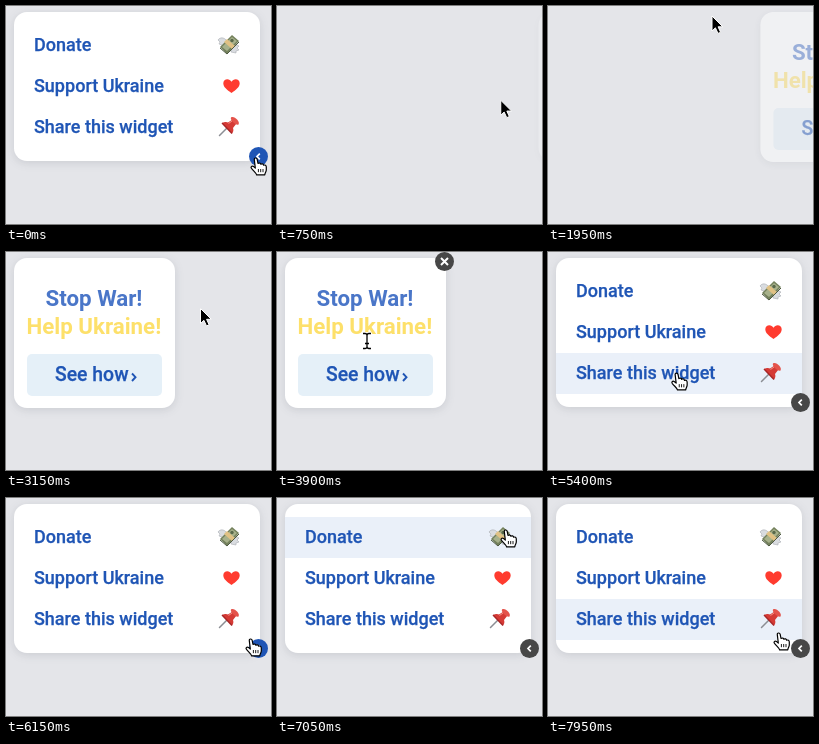
These frames come from a looping animation (265 by 218 pixels, 8000 ms). An HTML page:

```html
<!DOCTYPE html>
<html lang="en">
<head>
<meta charset="utf-8">
<style>
  html, body { margin: 0; width: 100%; height: 100%; overflow: hidden; background: #e4e5e9; }
  svg { display: block; width: 265px; height: 218px; }
  text { font-family: Roboto, sans-serif; font-weight: 700; fill: #1f55b5; }
  .item { font-size: 18px; font-weight: 500; stroke: #1f55b5; stroke-width: .25px; }
  .title { font-size: 22.3px; }
  .panel { fill: #fff; filter: drop-shadow(0 2px 4px rgba(40, 45, 65, .13)); }
  .hand { fill: #fff; stroke: #000; stroke-width: 1.2; stroke-linejoin: round; }
</style>
</head>
<body>
<svg viewBox="0 0 265 218">
  <g id="menu">
    <rect class="panel" x="8" y="6" width="246" height="149" rx="13"/>
    <rect id="row" x="8" width="246" height="41" fill="#eaf0f9"/>
    <text class="item" x="28" y="45">Donate</text>
    <text class="item" x="28" y="86">Support Ukraine</text>
    <text class="item" x="28" y="127">Share this widget</text>

    <g id="money">
      <path d="M221 35C218 31 214 31 212 34L214 36L213 38L216 39L216 41L220 41Z" fill="#d9dce0" stroke="#a9adb2" stroke-width=".6"/>
      <path d="M225 40L229 38L233 40L231 42L233 44L230 45L230 47L225 46Z" fill="#d9dce0" stroke="#a9adb2" stroke-width=".6"/>
      <path d="M214 41L226 29L233 35L221 48Z" fill="#73805b"/>
      <path d="M216 41L226 31L231 35L221 45Z" fill="#a7b18b"/>
      <path d="M218 36L221 33L229 40L226 43Z" fill="#e0c184"/>
      <circle cx="226" cy="34.5" r="1.7" fill="#59694a"/>
      <path d="M214 42L221 48L233 36" fill="none" stroke="#4e5a42"/>
    </g>

    <path id="heart" d="M225.5 87C221 84 217.3 81 217.3 77.3C217.3 72.5 223.4 71.7 225.5 75.7C227.6 71.7 233.7 72.5 233.7 77.3C233.7 81 230 84 225.5 87Z" fill="#ff3b2f"/>

    <g id="pin">
      <path d="M221 122L213.5 129.5" stroke="#8b8e94" stroke-width="1.5" stroke-linecap="round"/>
      <path d="M216 117C219 115.5 221 116 222 116.5L226.5 113.5L230.5 117.5L227 122C227.7 124 227.5 126 226 127.5Z" fill="#d53a35"/>
      <path d="M225 111.5C228 109.5 234.5 115.5 232.5 118.5C230.5 120 223.5 114 225 111.5Z" fill="#e4534b"/>
      <path d="M216 117L226 127.5" stroke="#a62526" stroke-width="1.4"/>
      <path d="M222.5 117.5L226 115" stroke="#f59488"/>
    </g>

    <circle id="toggle" cx="252.5" cy="150.5" r="9.5"/>
    <path d="M253.8 147.7L251 150.5L253.8 153.3" fill="none" stroke="#fff" stroke-width="1.7"/>
  </g>

  <g id="promo">
    <rect class="panel" x="8" y="6" width="161" height="150" rx="13"/>
    <text class="title" x="39.5" y="54" style="fill:#4a76c8">Stop War!</text>
    <text class="title" x="20.5" y="82" style="fill:#fde06a">Help Ukraine!</text>
    <rect x="21" y="102" width="135" height="42" rx="5" fill="#e5f0f8"/>
    <text x="49" y="129" font-size="19.4" style="font-weight:500;stroke:#1f55b5;stroke-width:.25px">See how</text>
    <path d="M126 121.5L129.5 125.2L126 129" fill="none" stroke="#1f55b5" stroke-width="1.9"/>
    <g id="close">
      <circle cx="167.5" cy="9.5" r="9.5" fill="#474747"/>
      <path d="M164 6L171 13M171 6L164 13" stroke="#fff" stroke-width="2"/>
    </g>
  </g>

  <g id="cursor">
    <path id="arrow" d="M0 0V15L3.4 11.8L6 17.4L8.6 16.3L6.1 10.8H10.8Z" fill="#000" stroke="#fff"/>
    <g id="hand" class="hand">
      <path d="M-1.7 1.6C-2 -.4 .8 -.6 1.2 1.4L2 5.5C3 4.6 4.6 5 4.8 6.2C6 5.4 7.4 5.9 7.6 7.2C9 6.6 10.3 7.4 10.3 9V12C10.2 14 9 15 8.8 16.8H.6C.3 15 -2 13.4 -4.5 10.4C-5.8 8.6 -4 7.4 -2.4 8.6L-.7 10Z"/>
      <path d="M2.4 11V14.2M4.7 11V14.2M7 11V14.2" stroke-width=".9"/>
    </g>
    <g id="beam" fill="none">
      <path d="M-4 -7.5H-2Q0 -7.5 0 -5.5Q0 -7.5 2 -7.5H4M-4 7.5H-2Q0 7.5 0 5.5Q0 7.5 2 7.5H4M0 -5.5V5.5M-2 2.5H2" stroke="#fff" stroke-width="3"/>
      <path d="M-4 -7.5H-2Q0 -7.5 0 -5.5Q0 -7.5 2 -7.5H4M-4 7.5H-2Q0 7.5 0 5.5Q0 7.5 2 7.5H4M0 -5.5V5.5M-2 2.5H2" stroke="#000" stroke-width="1.3"/>
    </g>
  </g>
</svg>
<script>
const LOOP = 8000, STEP = 150, WIDTH = 265;
const el = id => document.getElementById(id);
const clamp = v => Math.min(1, Math.max(0, v));
const ease = u => u * u * (3 - 2 * u);

// time, x, y of the pointer's hot spot
const path = [
  [0, 250, 152], [300, 250, 152], [900, 215, 75], [1350, 170, 17], [1500, 167, 13], [1650, 164, 10],
  [2400, 164, 10], [2850, 190, 35], [3450, 199, 78], [3600, 190, 84], [3900, 90, 89],
  [4200, 105, 108], [4500, 128, 122], [5550, 129, 121], [5700, 195, 138], [5850, 250, 150],
  [6000, 250, 150], [6150, 245, 141], [6450, 234, 113], [7050, 229, 32], [7200, 228, 33],
  [7500, 228, 66], [7950, 231, 135], [8000, 231, 135]
];

function pointerAt(t) {
  const i = path.findIndex(key => key[0] > t);
  const [t0, x0, y0] = path[i - 1], [t1, x1, y1] = path[i];
  const u = (t - t0) / (t1 - t0);
  return [x0 + (x1 - x0) * u, y0 + (y1 - y0) * u];
}

const slideIn = (t, start) => ease(clamp((t - start) / 400));

function place(id, shown) {
  el(id).setAttribute('transform', `translate(${WIDTH * (1 - shown)})`);
  el(id).setAttribute('opacity', Math.sqrt(shown));
}

const show = (id, on) => el(id).setAttribute('visibility', on ? 'visible' : 'hidden');

function draw(time) {
  const t = Math.floor(time % LOOP / STEP) * STEP;
  const [x, y] = pointerAt(t);
  const menu = t < 2000 ? 1 - slideIn(t, 400) : slideIn(t, 4694);
  const promo = t < 4500 ? slideIn(t, 1826) : 1 - slideIn(t, 4450);
  place('menu', menu);
  place('promo', promo);

  const onMenu = menu === 1, onPromo = promo === 1 && x < 169;
  const onToggle = menu > .9 && Math.hypot(x - 252.5, y - 150.5) < 12.5;
  const row = Math.floor((y - 19) / 41);
  const onRow = onMenu && !onToggle && x < 254 && row >= 0 && row < 3;
  const onClose = onPromo && Math.hypot(x - 167.5, y - 9.5) < 9.5;
  const onButton = onPromo && x > 21 && x < 156 && y > 102 && y < 144;

  el('toggle').setAttribute('fill', onToggle ? '#1f55b5' : '#474747');
  el('row').setAttribute('y', 19 + 41 * row);
  show('row', onRow);
  show('close', onPromo);

  const kind = onToggle || onRow || onClose || onButton ? 'hand'
    : onPromo && x > 21 && x < 156 && y > 34 && y < 102 ? 'beam' : 'arrow';
  for (const id of ['arrow', 'hand', 'beam']) show(id, id === kind);
  el('cursor').setAttribute('transform', `translate(${x} ${y})`);
}

function tick() {
  draw(performance.now());
  requestAnimationFrame(tick);
}
tick();
</script>
</body>
</html>
```
